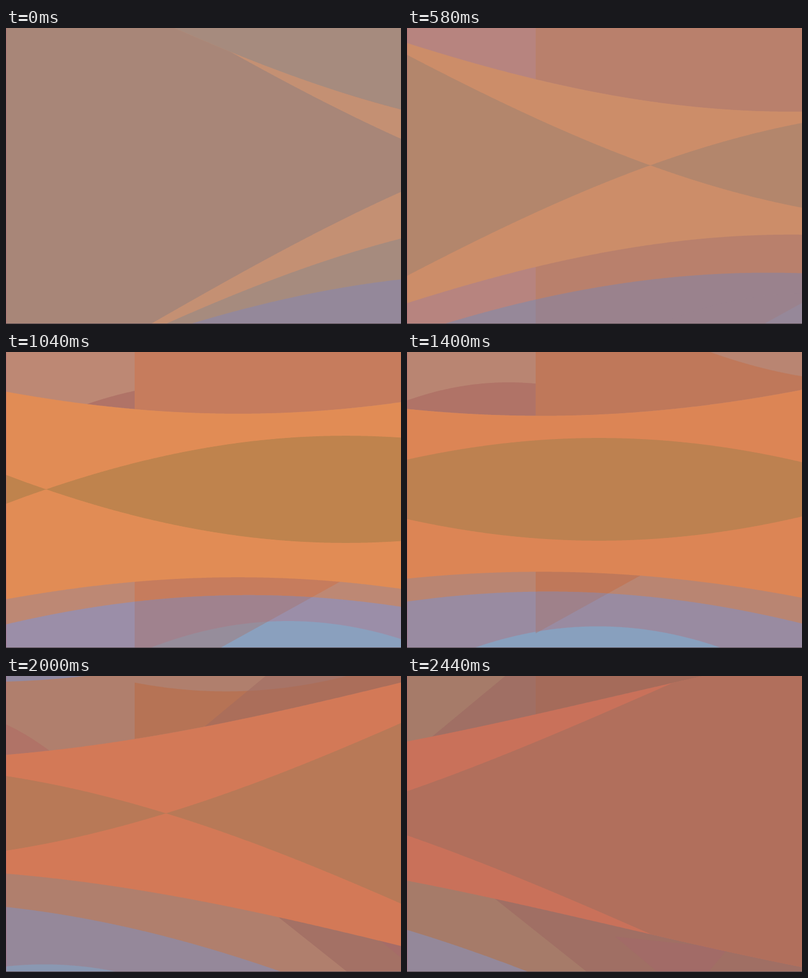
These frames come from a looping animation (700x527 px, 2.46 s). An HTML page with a canvas:

```html
<!DOCTYPE html>
<html lang="en">
<head>
<meta charset="utf-8">
<title>Waves</title>
<style>
html, body { margin: 0; width: 100%; height: 100%; overflow: hidden; background: #a68b7e; }
canvas { display: block; width: 700px; height: 527px; }
</style>
</head>
<body>
<canvas id="stage" width="700" height="527"></canvas>
<script>
const W = 700, H = 527, LOOP = 2460, END = 2440, STEP = 20;
const SEAM = 228, AXIS = 244.5;
const ctx = document.getElementById('stage').getContext('2d');

// Crest positions of the three travelling waves.
const beats = [0, 580, 1040, 1400, 1800, 2180, END];
const lensCrest = [1343, 962, 602, 340, -53, -419, -652];
const ribbonCrest = [2580, 1782, 1005, 530, -60, -490, -715];
const violetCrest = [900, 640, 430, 250, -25, -350, -570];

const shades = [0, 580, 1040, 1800, END];
const palette = {
  base: '#a68b7e #b7847f #bd8874 #b4816f #a67b69',
  panel: '#a68b7e #b9806c #c67c5d #b87457 #b27150',
  orange: '#c49073 #cc8d69 #e18c55 #d77d55 #c9715a',
  brown: '#a88678 #b3866c #bf834d #bb7e54 #b16f5c',
  violet: '#94889a #968899 #9b8ea8 #96889a #94889a',
  blue: '#94889a #968899 #8aa0be #859fbd #94889a'
};

function locate(keys, t) {
  let i = 0;
  while (i < keys.length - 2 && t >= keys[i + 1]) i++;
  return [i, (t - keys[i]) / (keys[i + 1] - keys[i])];
}

// Cubic path through unevenly timed values.
function glide(values, t) {
  const [i, u] = locate(beats, t), d = beats[i + 1] - beats[i];
  const slope = k => {
    const a = Math.max(0, k - 1), b = Math.min(beats.length - 1, k + 1);
    return (values[b] - values[a]) / (beats[b] - beats[a]) * d;
  };
  const v = u * u, w = v * u;
  return (2 * w - 3 * v + 1) * values[i] + (w - 2 * v + u) * slope(i) +
    (3 * v - 2 * w) * values[i + 1] + (w - v) * slope(i + 1);
}

function color(name, t) {
  const [i, u] = locate(shades, t), stops = palette[name].split(' ');
  const channel = (hex, k) => parseInt(hex.slice(k, k + 2), 16);
  const mix = k => channel(stops[i], k) * (1 - u) + channel(stops[i + 1], k) * u;
  return `rgb(${[1, 3, 5].map(k => Math.round(mix(k)))})`;
}

const wave = (base, amp, k, crest) => x => base + amp * Math.cos(k * (x - crest));
const parabola = (px, py, k) => x => py + k * (x - px) ** 2;

function band(top, bottom, fill, from = 0) {
  ctx.beginPath();
  for (let x = from; x <= W; x += 2) ctx.lineTo(x, top(x));
  for (let x = W; x >= from; x -= 2) ctx.lineTo(x, Math.max(top(x), bottom(x)));
  ctx.fillStyle = fill;
  ctx.fill();
}

function poly(fill, alpha, ...points) {
  ctx.globalAlpha = alpha;
  ctx.beginPath();
  points.forEach(([x, y]) => ctx.lineTo(x, y));
  ctx.fillStyle = fill;
  ctx.fill();
  ctx.globalAlpha = 1;
}

function draw(t) {
  const u = t / END;
  const ceiling = () => 0, floor = () => H;
  const base = color('base', t), panel = color('panel', t);

  const gain = 0.865 + 0.265 * (1 - u) ** 1.3;
  const lens = wave(268 * gain, -364 * gain, 0.0014, glide(lensCrest, t));
  const swell = wave(163 - 0.09 * t, 200, 0.0011, glide(ribbonCrest, t));
  const mid = 260 - 19.5 * u ** 1.7;
  const top = x => mid - lens(x) - swell(x);
  const bottom = x => mid + lens(x) + swell(x);
  const violet = wave(836 - 74 * u ** 3.7, -400, 0.0012, glide(violetCrest, t));
  const dome = parabola(968 - 0.45 * t, 470 + 70 * u ** 2.4, 0.0008);
  const hump = parabola(915 - 0.525 * t, 54, 0.0006 + 0.0021 * u ** 3);
  const veil = parabola(1890 - 0.75 * t, 119.4 - 0.046 * t, -0.0006);

  ctx.fillStyle = base;
  ctx.fillRect(0, 0, W, H);

  // Upper background
  band(hump, top, '#b07367');
  band(ceiling, top, panel, SEAM);
  band(ceiling, x => Math.min(veil(x), top(x)), base, SEAM);
  const reach = 170 * Math.sin(Math.PI * (t - 1450) / 800);
  if (t > 1450 && reach > 0) {
    ctx.beginPath();
    ctx.lineTo(0, 0);
    ctx.lineTo(0, 10);
    ctx.quadraticCurveTo(reach / 2, 8, reach, 0);
    ctx.fillStyle = '#9289a0';
    ctx.fill();
  }

  // Lower background, with the panel cut by a sloping edge
  const edge = y => 1162 - 0.55 * t - 1.8 * (y - 410);
  const cut = () => {
    ctx.beginPath();
    ctx.rect(SEAM, mid, W, H);
    ctx.clip();
    ctx.beginPath();
    ctx.lineTo(-W, mid);
    ctx.lineTo(edge(mid), mid);
    ctx.lineTo(edge(H), H);
    ctx.lineTo(-W, H);
    ctx.clip();
  };
  ctx.save();
  cut();
  ctx.fillStyle = panel;
  ctx.fillRect(0, 0, W, H);
  ctx.restore();

  // Dark facets sliding in from the right
  const facet = 1760 - 0.65 * t, far = 2 * W;
  const depth = Math.min(0.6, 0.35 + (t - 1800) / 1500);
  if (facet < W) {
    poly('#9d6861', Math.max(0, depth), [facet, 0], [facet - 1.2 * mid, mid], [far, mid], [far, 0]);
    poly('#9d6861', 0.6, [facet - 39, 380], [facet + 145, H], [far, H], [far, 380]);
    const glow = facet + 195;
    poly('#a5616f', 0.3, [glow, 464], [glow + 75, H], [glow + 165, H], [glow + 200, 485]);
  }

  band(violet, floor, color('violet', t));
  band(dome, floor, color('blue', t));
  ctx.save();
  cut();
  ctx.globalAlpha = 0.4 * Math.min(1, u / 0.42);
  band(violet, floor, '#a87068');
  ctx.restore();

  // Ribbon and the lens inside it
  band(top, bottom, color('orange', t));
  band(x => Math.max(AXIS - Math.abs(lens(x)), top(x)),
    x => Math.min(AXIS + Math.abs(lens(x)), bottom(x)), color('brown', t));

  ctx.fillStyle = 'rgba(190, 90, 120, .4)';
  ctx.fillRect(0, 0, 1, H);
  ctx.fillStyle = '#584a50';
  ctx.fillRect(0, H - 1, W, 1);
}

const start = performance.now();
function tick(now) {
  const t = Math.max(0, now - start) % LOOP;
  draw(Math.floor(t / STEP) * STEP);
  requestAnimationFrame(tick);
}
draw(0);
requestAnimationFrame(tick);
</script>
</body>
</html>
```
